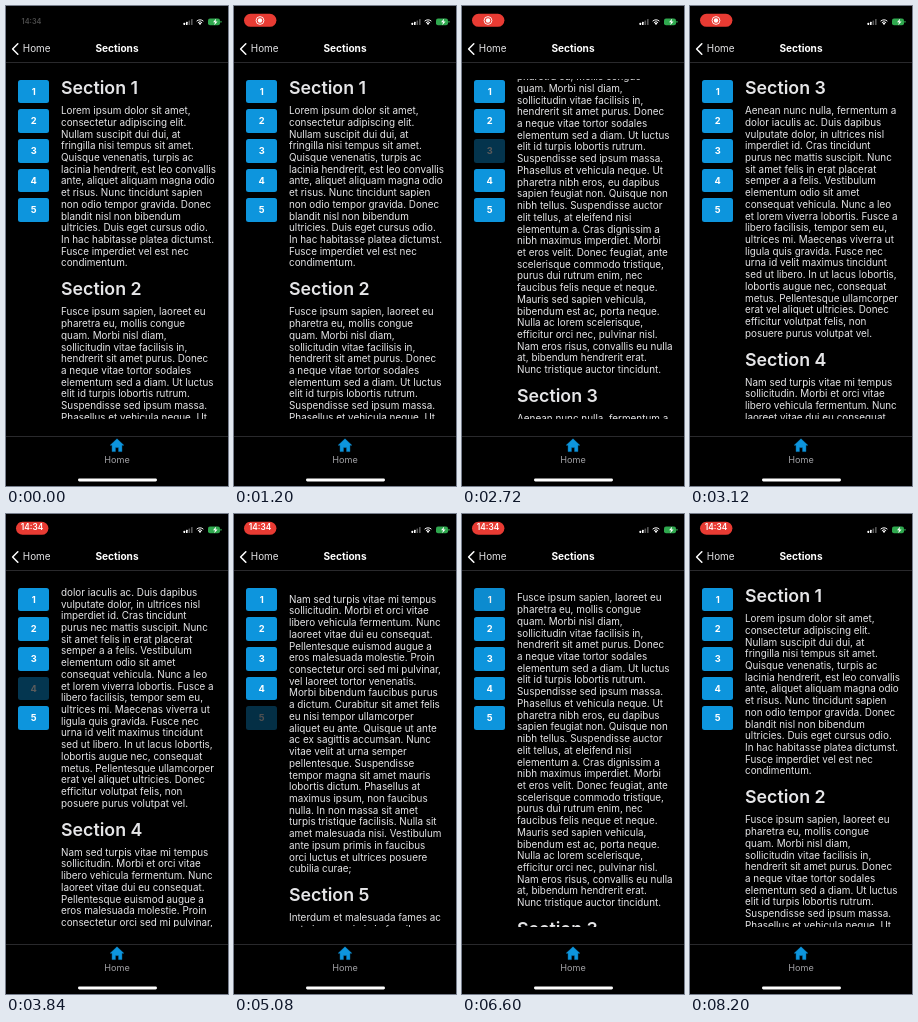
An HTML page that plays this animation: 222 by 480 pixels, repeating every 8240 ms.

```html
<!DOCTYPE html>
<html lang="en">
<head>
<meta charset="utf-8">
<title>Sections</title>
<style>
html, body { margin: 0; width: 100%; height: 100%; overflow: hidden; background: #000; }
body { position: relative; font: 9.88px/11.72px Inter, "Open Sans", sans-serif; color: #e5e5e7; }
svg, .at, #view { position: absolute; }
svg { left: 0; top: 0; }
.at { white-space: nowrap; transform: translate(-50%, -50%); }
#view { left: 55px; top: 73px; width: 167px; height: 340px; overflow: hidden; }
#content { padding-top: 1px; }
h2 { margin: 0 0 9.14px; font-size: 17.8px; font-weight: 600; line-height: 16px; }
p { margin: 0 0 12.14px; white-space: pre; }
.button {
  position: absolute; left: 12px; width: 31.4px; height: 23.8px; border-radius: 2.5px;
  background: #0d95dd; color: #fff; font-weight: 700; font-size: 9.3px;
  line-height: 23.8px; text-align: center;
}
#clock { left: 26px; top: 14.2px; font-size: 8.3px; font-weight: 600; color: #fff; }
#idle { left: 25.5px; top: 16px; font-size: 7.3px; font-weight: 600; color: #fff; }
</style>
</head>
<body>
<svg width="222" height="480" viewBox="0 0 222 480">
  <g id="pill">
    <rect x="10" y="7.8" width="32.4" height="13" rx="6.5" fill="#e83b33"/>
    <g id="stop">
      <circle cx="26" cy="14.5" r="3.9" fill="none" stroke="#fff" stroke-width=".9"/>
      <circle cx="26" cy="14.5" r="2.2" fill="#fff"/>
    </g>
  </g>
  <g fill="#fff">
    <rect x="177.5" y="16.8" width="1.6" height="2.2" rx=".5"/>
    <rect x="180" y="15.8" width="1.6" height="3.2" rx=".5"/>
    <g opacity=".35">
      <rect x="182.5" y="14.4" width="1.6" height="4.6" rx=".5"/>
      <rect x="185" y="13" width="1.6" height="6" rx=".5"/>
    </g>
    <path d="M194 19l-1.4-1.5a2 2 0 0 1 2.8 0z"/>
  </g>
  <path d="M190.6 15.2a4.9 4.9 0 0 1 6.8 0M191.9 16.7a3 3 0 0 1 4.2 0" fill="none" stroke="#fff" stroke-width="1"/>
  <rect x="202" y="12.6" width="12" height="6.6" rx="2" fill="#2fa84e"/>
  <rect x="214.5" y="14.8" width=".9" height="2.2" rx=".4" fill="#2fa84e"/>
  <path d="M210.2 12.6l-3.2 3.7h2l-.8 3 3.4-3.8h-2.1z" fill="#fff"/>
  <path d="M11.8 37.8L6.6 43l5.2 5.2" fill="none" stroke="#fff" stroke-width="1.5" stroke-linecap="round" stroke-linejoin="round"/>
  <path d="M0 56.5h222M0 430.5h222" stroke="#29292c" stroke-width="1"/>
  <path d="M111 432.8l6.8 6.4h-1.9v6.4h-3.3v-4h-3.2v4h-3.3v-6.4h-1.9z" fill="#0d95dd" stroke="#0d95dd" stroke-width=".4" stroke-linejoin="round"/>
  <rect x="72" y="472.6" width="79" height="2.8" rx="1.4" fill="#fff"/>
</svg>
<div class="at" id="clock">14:34</div>
<div class="at" id="idle">14:34</div>
<div class="at" style="left:30.7px;top:43px">Home</div>
<div class="at" style="left:111px;top:43px;font-weight:700;font-size:10.1px;color:#fff">Sections</div>
<div class="at" style="left:111px;top:454px;font-size:9.1px;color:#a0a0a4">Home</div>

<div id="view"><div id="content"><h2>Section 1</h2><p>Lorem ipsum dolor sit amet,
consectetur adipiscing elit.
Nullam suscipit dui dui, at
fringilla nisi tempus sit amet.
Quisque venenatis, turpis ac
lacinia hendrerit, est leo convallis
ante, aliquet aliquam magna odio
et risus. Nunc tincidunt sapien
non odio tempor gravida. Donec
blandit nisl non bibendum
ultricies. Duis eget cursus odio.
In hac habitasse platea dictumst.
Fusce imperdiet vel est nec
condimentum.</p><h2>Section 2</h2><p>Fusce ipsum sapien, laoreet eu
pharetra eu, mollis congue
quam. Morbi nisl diam,
sollicitudin vitae facilisis in,
hendrerit sit amet purus. Donec
a neque vitae tortor sodales
elementum sed a diam. Ut luctus
elit id turpis lobortis rutrum.
Suspendisse sed ipsum massa.
Phasellus et vehicula neque. Ut
pharetra nibh eros, eu dapibus
sapien feugiat non. Quisque non
nibh tellus. Suspendisse auctor
elit tellus, at eleifend nisi
elementum a. Cras dignissim a
nibh maximus imperdiet. Morbi
et eros velit. Donec feugiat, ante
scelerisque commodo tristique,
purus dui rutrum enim, nec
faucibus felis neque et neque.
Mauris sed sapien vehicula,
bibendum est ac, porta neque.
Nulla ac lorem scelerisque,
efficitur orci nec, pulvinar nisl.
Nam eros risus, convallis eu nulla
at, bibendum hendrerit erat.
Nunc tristique auctor tincidunt.</p><h2>Section 3</h2><p>Aenean nunc nulla, fermentum a
dolor iaculis ac. Duis dapibus
vulputate dolor, in ultrices nisl
imperdiet id. Cras tincidunt
purus nec mattis suscipit. Nunc
sit amet felis in erat placerat
semper a a felis. Vestibulum
elementum odio sit amet
consequat vehicula. Nunc a leo
et lorem viverra lobortis. Fusce a
libero facilisis, tempor sem eu,
ultrices mi. Maecenas viverra ut
ligula quis gravida. Fusce nec
urna id velit maximus tincidunt
sed ut libero. In ut lacus lobortis,
lobortis augue nec, consequat
metus. Pellentesque ullamcorper
erat vel aliquet ultricies. Donec
efficitur volutpat felis, non
posuere purus volutpat vel.</p><h2>Section 4</h2><p>Nam sed turpis vitae mi tempus
sollicitudin. Morbi et orci vitae
libero vehicula fermentum. Nunc
laoreet vitae dui eu consequat.
Pellentesque euismod augue a
eros malesuada molestie. Proin
consectetur orci sed mi pulvinar,
vel laoreet tortor venenatis.
Morbi bibendum faucibus purus
a dictum. Curabitur sit amet felis
eu nisi tempor ullamcorper
aliquet eu ante. Quisque ut ante
ac ex sagittis accumsan. Nunc
vitae velit at urna semper
pellentesque. Suspendisse
tempor magna sit amet mauris
lobortis dictum. Phasellus at
maximus ipsum, non faucibus
nulla. In non massa sit amet
turpis tristique facilisis. Nulla sit
amet malesuada nisi. Vestibulum
ante ipsum primis in faucibus
orci luctus et ultrices posuere
cubilia curae;</p><h2>Section 5</h2><p>Interdum et malesuada fames ac
ante ipsum primis in faucibus.
Aenean tincidunt a arcu eget
scelerisque. Cras et posuere
arcu, commodo imperdiet augue.
Mauris luctus felis eu mi eleifend
aliquet. Vivamus et justo
malesuada, interdum sapien ac,
rutrum enim. Ut ultrices eleifend
turpis et faucibus. Quisque
magna leo, blandit sit amet justo
at, faucibus volutpat lorem.
Praesent sapien urna, commodo
eget nunc eu, pellentesque
suscipit dui</p></div></div>

<script>
const LOOP = 8240, HOLD = 90, SCROLL = 300, FADE = 250;
// Each tap: button index, release time, scroll offset it leads to
const taps = [
  [1, 1510, 201.4], [2, 2645, 555.1], [3, 3762, 826.8], [4, 5014, 1017.4], [0, 6400, 0]
];
const $ = id => document.getElementById(id);
const clamp = x => Math.min(1, Math.max(0, x));
const ease = x => x < .5 ? 2 * x * x : 1 - 2 * (1 - x) ** 2;
const ramp = (t, start, length) => clamp((t - start) / length);

const buttons = [1, 2, 3, 4, 5].map((label, i) => {
  const b = document.createElement('div');
  b.className = 'button';
  b.textContent = label;
  b.style.top = 73.5 + 29.7 * i + 'px';
  document.body.append(b);
  return b;
});

function draw(t) {
  let offset = 0;
  for (const [i, release, stop] of taps) {
    offset += (stop - offset) * ease(ramp(t, release, SCROLL));
    buttons[i].style.opacity = t < release - HOLD ? 1 : .2 + .8 * ease(ramp(t, release, FADE));
  }
  $('content').style.transform = `translateY(${-offset}px)`;

  const toClock = ramp(t, 3250, 200);
  $('pill').style.opacity = ramp(t, 100, 300);
  $('stop').style.opacity = 1 - toClock;
  $('clock').style.opacity = toClock;
  $('idle').style.opacity = .3 * (1 - ramp(t, 0, 200));
}

const begin = performance.now();
function tick() {
  draw((performance.now() - begin) % LOOP);
  requestAnimationFrame(tick);
}
tick();
</script>
</body>
</html>
```
